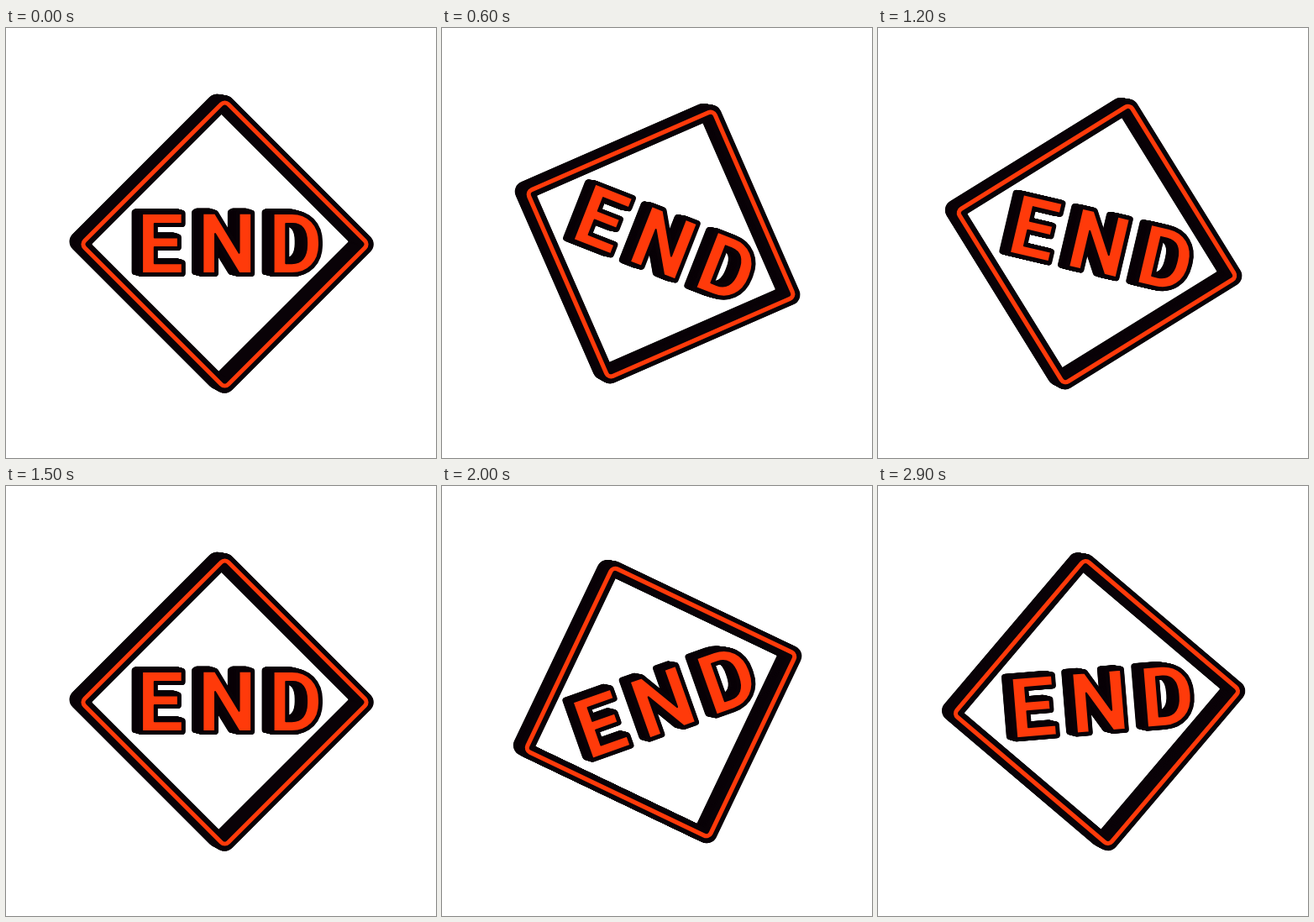
An HTML page with a canvas for the animation above (3 s loop, 512 by 512 pixels).

```html
<!DOCTYPE html>
<html lang="en">
<head>
<meta charset="utf-8">
<title>END sign</title>
<style>
  html, body { margin: 0; width: 100%; height: 100%; overflow: hidden; background: #fff; }
  canvas { display: block; width: 100vmin; height: 100vmin; }
</style>
</head>
<body>
<canvas id="stage" width="512" height="512"></canvas>
<script>
const ctx = document.getElementById('stage').getContext('2d');
const INK = '#090207', ORANGE = '#ff3a0a';
const LOOP = 3000, STEP = 100, SWING = 22.5;
const BASELINE = 34.5;
const LETTERS = [['E', -109.8], ['N', -37.6], ['D', 46.7]];

function square(half, radius) {
  ctx.roundRect(-half, -half, half * 2, half * 2, radius);
}

// Runs draw() in the sign's own plane, centred on x, y.
function pose(x, y, angle, scale, draw) {
  ctx.save();
  ctx.translate(x, y);
  ctx.scale(scale, scale);
  ctx.rotate(angle);
  draw();
  ctx.restore();
}

// Sweeps a shape from its back position, slightly smaller, to the front.
function extrude(x, y, dx, dy, angle, draw) {
  const layers = 24;
  for (let i = layers; i >= 0; i--) {
    const k = i / layers;
    pose(x - dx * k, y - dy * k, angle, 1 - 0.01 * k, draw);
  }
}

function ring() {
  ctx.beginPath();
  square(129, 12.5);
  square(112, 1);
  ctx.fillStyle = INK;
  ctx.fill('evenodd');
}

function stripe() {
  ctx.beginPath();
  square(120.9, 6);
  ctx.lineWidth = 5.2;
  ctx.strokeStyle = ORANGE;
  ctx.stroke();
}

function outline(width) {
  ctx.lineWidth = width;
  ctx.strokeStyle = INK;
  for (const [ch, x] of LETTERS) ctx.strokeText(ch, x, BASELINE);
}

function word() {
  ctx.fillStyle = ORANGE;
  for (const [ch, x] of LETTERS) ctx.fillText(ch, x, BASELINE);
  outline(2);
}

function render(ms) {
  const t = Math.floor((ms % LOOP) / STEP) * STEP / LOOP;
  const tilt = SWING * Math.sin(t * 2 * Math.PI) * Math.PI / 180;
  const diamond = tilt + Math.PI / 4;

  ctx.fillStyle = '#fff';
  ctx.fillRect(0, 0, 512, 512);
  ctx.font = 'bold 100px Roboto, Arial, sans-serif';
  ctx.lineJoin = 'round';

  extrude(260.5, 257.5, 9.5, 3.3, diamond, ring);
  pose(260.5, 257.5, diamond, 1, stripe);
  extrude(265.5, 257.5, 9.5, 2, tilt, () => outline(8));
  pose(265.5, 257.5, tilt, 1, word);
}

const start = performance.now();
function tick() {
  render(performance.now() - start);
  requestAnimationFrame(tick);
}
tick();
</script>
</body>
</html>
```
